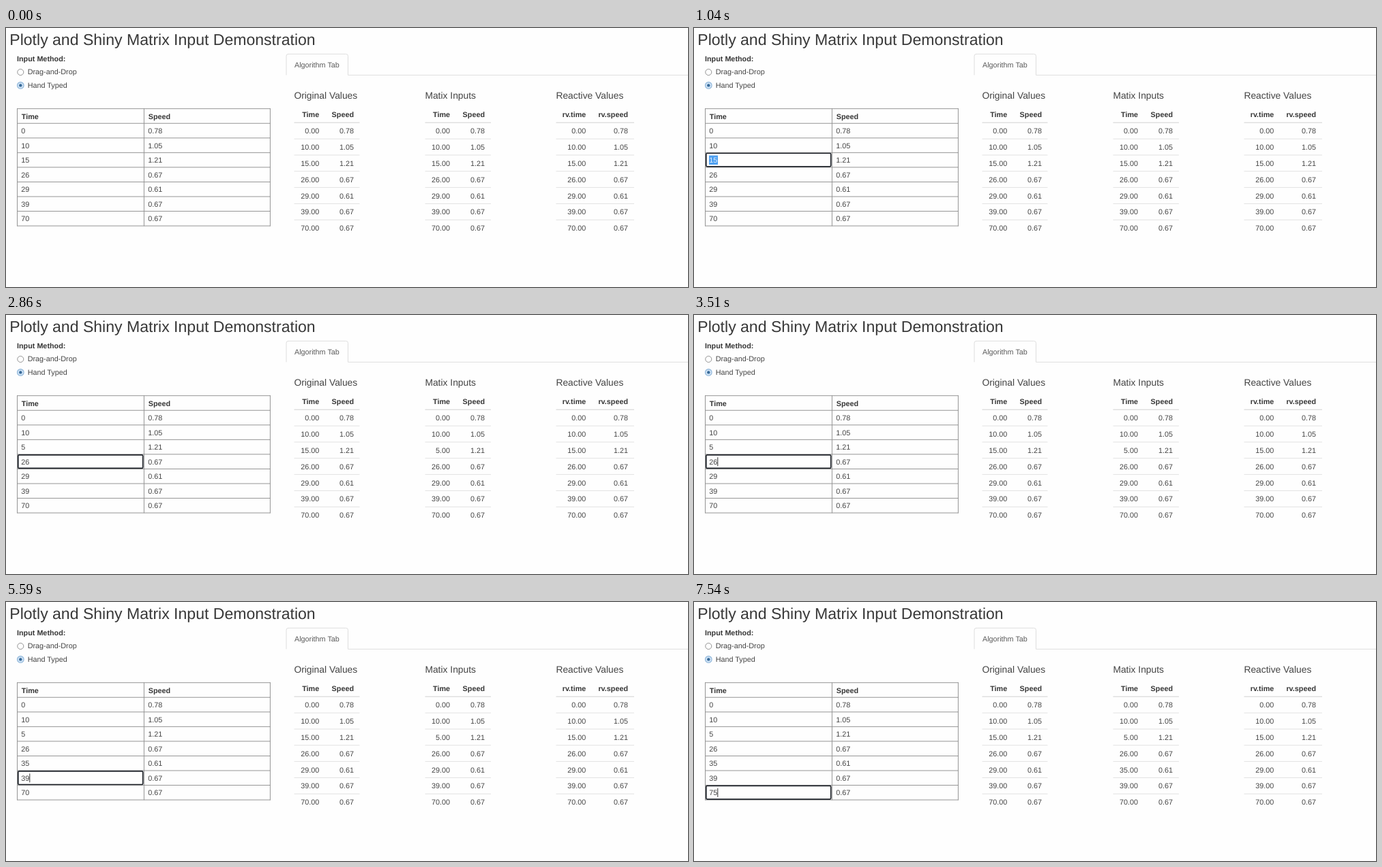
Animation of 1000x381 px, one loop 8000 ms. Source, as an HTML page:

```html
<!DOCTYPE html>
<html lang="en">
<head>
<meta charset="utf-8">
<title>Matrix Input</title>
<style>
  html, body { margin: 0; width: 100%; height: 100%; overflow: hidden; background: #fefefe; }
  svg { display: block; width: 100%; height: 100%; }
  text { font: 10.8px "Liberation Sans", Arial, sans-serif; fill: #444; text-rendering: geometricPrecision; }
  .bold { font-weight: bold; fill: #363636; }
  .title { font-size: 23.05px; fill: #383838; }
  .heading { font-size: 13.85px; }
  .end { text-anchor: end; }
</style>
</head>
<body>
<svg id="stage" viewBox="0 0 1000 381"></svg>
<script>
const stage = document.getElementById('stage');
const LOOP = 8000;
const TIMES = [0, 10, 15, 26, 29, 39, 70];
const SPEEDS = ['0.78', '1.05', '1.21', '0.67', '0.61', '0.67', '0.67'];
const GRID_TOP = 118.7, GRID_ROW = 21.55;

function add(tag, attrs, content) {
  const el = document.createElementNS('http://www.w3.org/2000/svg', tag);
  for (const key in attrs) el.setAttribute(key, attrs[key]);
  if (content !== undefined) el.textContent = content;
  return stage.appendChild(el);
}
const label = (x, y, content, cls = '') => add('text', { x, y, class: cls }, content);
const path = (d, stroke, width = 1, fill = 'none') =>
  add('path', { d, stroke, 'stroke-width': width, fill });
const rowTop = row => GRID_TOP + GRID_ROW * (row + 1);
const show = (el, on) => el.setAttribute('visibility', on ? 'visible' : 'hidden');

// Page header and input choice
label(5.3, 25, 'Plotly and Shiny Matrix Input Demonstration', 'title');
label(16, 48.9, 'Input Method:', 'bold');
add('circle', { cx: 21.3, cy: 65, r: 4.5, fill: '#fff', stroke: '#888', 'stroke-width': 0.9 });
label(31.7, 68.4, 'Drag-and-Drop');
add('circle', { cx: 21.3, cy: 84.4, r: 4.8, fill: '#cfe3f6', stroke: '#8db4d8', 'stroke-width': 1.1 });
add('circle', { cx: 21.3, cy: 84.4, r: 2.2, fill: '#376998' });
label(31.7, 87.8, 'Hand Typed');

// Tab bar
path('M411 69.3V41.3Q411 38.3 414 38.3H498.5Q501.5 38.3 501.5 41.3V69.3H1000', '#dedede');
label(423, 57.5, 'Algorithm Tab').style.fill = '#595959';

// Editable grid
let lines = 'M16.5 118.5V291.3M202.4 118.5V291.3M387.4 118.5V291.3';
for (let i = 0; i <= 8; i++) lines += `M16 ${GRID_TOP + i * GRID_ROW}H388`;
path(lines, '#949494');
label(22.8, 133.7, 'Time', 'bold');
label(208.7, 133.7, 'Speed', 'bold');
const selection = add('rect', { x: 22, width: 13, height: 13.5, fill: '#4d9ff0' });
const cells = TIMES.map((time, i) => {
  const y = rowTop(i) + 14.7;
  label(208.2, y, SPEEDS[i]);
  return label(22.3, y, time);
});

// Result tables
function resultTable(x, width, timeEnd, speedEnd, heading, names) {
  label(x - 0.1, 104.4, heading, 'heading');
  label(timeEnd, 130.7, names[0], 'bold end');
  label(speedEnd, 130.7, names[1], 'bold end');
  path(`M${x} 139.3h${width}`, '#e0e0e0', 1.4);
  return TIMES.map((time, i) => {
    const y = 155.3 + i * 23.83;
    if (i) path(`M${x} ${139.3 + i * 23.83}h${width}`, '#e2e2e2');
    label(speedEnd, y, SPEEDS[i], 'end');
    return label(timeEnd, y, time.toFixed(2), 'end');
  });
}
resultTable(422.5, 96, 459.2, 510, 'Original Values', ['Time', 'Speed']);
const inputs = resultTable(614.5, 96.5, 651, 702, 'Matix Inputs', ['Time', 'Speed']);
resultTable(806.5, 114.5, 850.3, 912, 'Reactive Values', ['rv.time', 'rv.speed']);

// Focus frame, caret and pointer
const frame = add('rect', { x: 17.8, width: 182.9, height: 19.6, rx: 1.5, fill: 'none', stroke: '#20242b', 'stroke-width': 1.7 });
const caret = add('rect', { width: 1, height: 13, fill: '#333' });
const hand = path('M-1.4 1Q0 -1 1.4 1V6Q3 4.7 4 6.5Q5.6 5.6 6.4 7.3Q8 6.7 8.2 8.5V11.5Q8 14 6.6 16.2H-.4Q-1.6 13.6-4 10.4Q-4.2 8.4-2.8 8.6L-1.4 10ZM1.4 6V8.5M4 6.5V9M6.4 7.3V9.3',
  '#707070', 0.8, '#fff');

// Each step changes only the named parts of the state.
const STEPS = [
  [0, { edits: {}, results: {}, focus: -1, caret: false, select: false, hand: null }],
  [130, { hand: [150, 256] }],
  [260, { hand: [146, 240] }],
  [390, { hand: [141, 222] }],
  [520, { hand: [135, 206.5] }],
  [650, { hand: [98, 201] }],
  [780, { hand: [56, 195] }],
  [910, { hand: [31, 192] }],
  [1040, { hand: null, focus: 2, select: true }],
  [2080, { edits: { 2: 5 }, select: false, caret: true }],
  [2340, { focus: 3 }],
  [2470, { results: { 2: 5 } }],
  [2860, { caret: false }],
  [3380, { caret: true }],
  [3770, { hand: [48, 222] }],
  [3900, { caret: false, hand: [38, 230] }],
  [4030, { hand: [33, 234] }],
  [4290, { hand: null, focus: 4, select: true }],
  [5200, { edits: { 2: 5, 4: 3 }, select: false, caret: true }],
  [5330, { edits: { 2: 5, 4: 35 } }],
  [5590, { focus: 5 }],
  [5720, { results: { 2: 5, 4: 35 } }],
  [6110, { caret: false }],
  [6370, { hand: [33.5, 275.5] }],
  [6500, { hand: [32, 275] }],
  [6630, { hand: [31, 275] }],
  [6760, { hand: null, focus: 6, select: true }],
  [7410, { edits: { 2: 5, 4: 35, 6: 7 }, select: false, caret: true }],
  [7540, { edits: { 2: 5, 4: 35, 6: 75 } }]
];

function render(time) {
  const state = Object.assign({}, ...STEPS.filter(([at]) => at <= time).map(([, change]) => change));
  const { edits, results, focus } = state;
  const selected = state.select;
  TIMES.forEach((value, i) => {
    cells[i].textContent = edits[i] ?? value;
    cells[i].style.fill = selected && i === focus ? '#e8f3ff' : '';
    inputs[i].textContent = (results[i] ?? value).toFixed(2);
  });
  show(frame, focus >= 0);
  show(selection, selected);
  show(caret, state.caret);
  show(hand, state.hand);
  if (focus >= 0) {
    const top = rowTop(focus);
    frame.setAttribute('y', top + 0.9);
    selection.setAttribute('y', top + 4.2);
    caret.setAttribute('y', top + 4.4);
    caret.setAttribute('x', 22.3 + cells[focus].textContent.length * 6);
  }
  if (state.hand) hand.setAttribute('transform', `translate(${state.hand})`);
}

const start = performance.now();
function tick() {
  render((performance.now() - start) % LOOP);
  requestAnimationFrame(tick);
}
tick();
</script>
</body>
</html>
```
